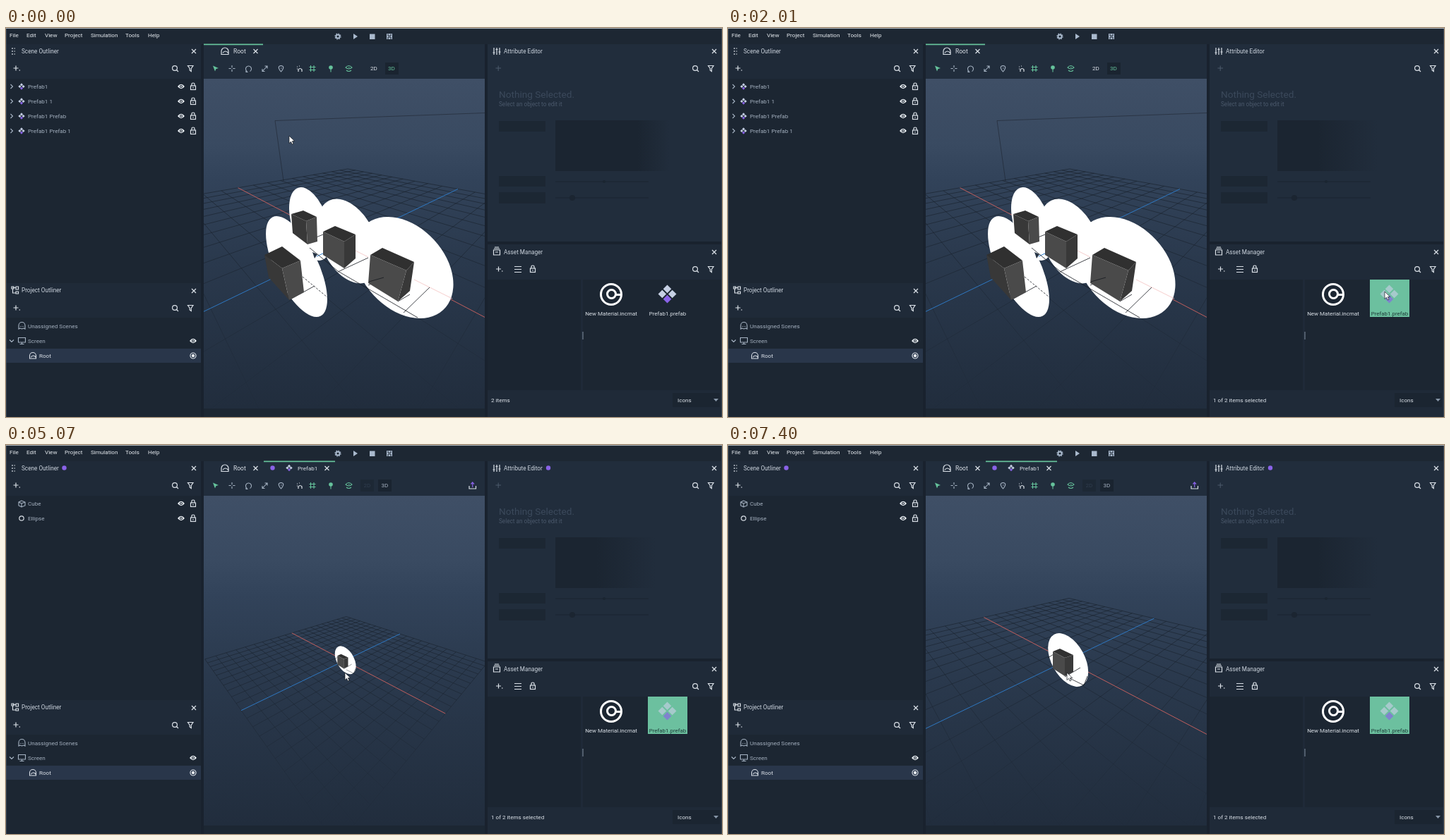
An HTML page for the animation above (8 s loop, 1014 by 552 pixels).

```html
<!DOCTYPE html>
<html lang="en">
<head>
<meta charset="utf-8">
<title>Prefab editor</title>
<style>
html, body { margin: 0; width: 100%; height: 100%; overflow: hidden; background: #1a2430; }
svg { display: block; width: 1014px; height: 552px; }
text { font: 8.1px Roboto, sans-serif; fill: #a4b0bf; }
.menu text { fill: #e6ebf0; }
.head text { font-size: 8.2px; fill: #ccd4de; }
.bright { fill: #dce2e9; }
.line { fill: none; stroke: #dbe1e8; stroke-width: 1.2; }
.grey { fill: none; stroke: #a7b4c4; stroke-width: 1.1; }
.green { fill: none; stroke: #66c39c; stroke-width: 1.1; }
.ink { fill: none; stroke: #15191f; stroke-width: .8; }
.mid { text-anchor: middle; }
</style>
</head>
<body>
<svg viewBox="0 0 1014 552">
<defs>
  <linearGradient id="sky" x2="0" y2="1">
    <stop stop-color="#3f4f66"/><stop offset=".2" stop-color="#394a61"/>
    <stop offset=".3" stop-color="#32435a"/><stop offset=".55" stop-color="#2a394d"/>
    <stop offset="1" stop-color="#212d3d"/>
  </linearGradient>
  <linearGradient id="fade" gradientUnits="userSpaceOnUse" x1="0" y1="200" x2="0" y2="520">
    <stop stop-color="#18212c" stop-opacity=".9"/><stop offset=".4" stop-color="#18212c" stop-opacity=".8"/>
    <stop offset="1" stop-color="#18212c" stop-opacity=".15"/>
  </linearGradient>
  <linearGradient id="longFade">
    <stop offset=".72" stop-color="#1b2531"/><stop offset="1" stop-color="#1b2531" stop-opacity="0"/>
  </linearGradient>
  <linearGradient id="shortFade">
    <stop offset=".38" stop-color="#1b2531"/><stop offset=".95" stop-color="#1b2531" stop-opacity="0"/>
  </linearGradient>
  <clipPath id="port"><rect x="280" y="72" width="398" height="468"/></clipPath>

  <path id="dia" d="M0-2.1 2.1 0 0 2.1-2.1 0Z"/>
  <g id="prefab">
    <g fill="#c6d0e4"><use href="#dia" y="-2.6"/><use href="#dia" x="-2.6"/><use href="#dia" x="2.6"/></g>
    <use href="#dia" y="2.6" fill="#8a63e8"/>
  </g>
  <path id="x" class="line" d="M-3-3 3 3M3-3-3 3"/>
  <g id="eye">
    <path d="M-5 0Q0-6.4 5 0 0 6.4-5 0Z" fill="#e8edf2"/>
    <circle r="2.1" fill="#1c2632"/><circle r="1" fill="#e8edf2"/>
  </g>
  <g id="lock" class="line">
    <rect x="-3.5" y="-1" width="7" height="5.5"/><path d="M-2-1V-3Q-2-5 0-5T2-3V-1M0 1V2.4"/>
  </g>
  <g id="add"><path class="line" d="M-4 0H3M-.5-3.5V3.5"/><circle cx="4.8" cy="3" r=".8" fill="#dbe1e8"/></g>
  <g id="tools">
    <use href="#x" x="266" y="33"/>
    <circle class="line" cx="239" cy="57" r="3.4"/><path class="line" d="M241.5 59.5 244 62"/>
    <path class="line" d="M257.5 53.5H265L262.3 57.5V61.5L260.2 60V57.5Z"/>
  </g>
  <g id="vis"><use href="#eye" x="248"/><use href="#lock" x="265"/></g>
  <g id="row"><path class="grey" d="M6.5-3 9.5 0 6.5 3"/><use href="#prefab" x="22"/><use href="#vis"/></g>
  <path id="arch" class="line" d="M-5 4.5V0A5 5 0 0 1 5 0V4.5ZM-3 2.5Q0-2.5 5 2.5"/>
  <circle id="dot" r="3.2" fill="#8a63e8"/>
  <path id="tree" class="line" d="M-5-5H-2V-2H-5ZM-3.5-2V4H1M-3.5-3.500H1M1-5H4.500V-1H1ZM1 2H4.500V5H1Z"/>
</defs>

<!-- panels -->
<rect width="1014" height="552" fill="#19222e"/>
<rect y="1" width="1014" height="22" fill="#1d2733"/>
<rect y="23" width="276" height="529" fill="#1c2632"/>
<rect y="23" width="276" height="49" fill="#1f2a38"/>
<rect y="362" width="276" height="49" fill="#1f2a38"/>
<rect y="455" width="276" height="20" fill="#29364a"/>
<rect x="280" y="23" width="398" height="49" fill="#212d3c"/>
<rect x="280" y="540" width="398" height="12" fill="#1c2733"/>
<rect x="682" y="23" width="331" height="280" fill="#212d3c"/>
<rect x="682" y="307" width="331" height="245" fill="#1f2a38"/>
<rect x="682" y="357" width="132" height="157" fill="#1b2531"/>
<rect x="817" y="357" width="196" height="157" fill="#1c2632"/>
<rect x="944" y="518" width="67" height="20" fill="#1b2531"/>
<path d="M817 431V442" stroke="#748293" stroke-width="1.2"/>
<path d="M0 .5H1014" stroke="#aeb4ba"/>
<path d="M.5 1V552M1013.5 1V552" stroke="#4b5663" stroke-width=".6"/>

<g class="menu">
  <text x="5" y="12.5">File</text><text x="29" y="12.5">Edit</text><text x="55" y="12.5">View</text>
  <text x="83" y="12.5">Project</text><text x="120" y="12.5">Simulation</text>
  <text x="169" y="12.5">Tools</text><text x="201" y="12.5">Help</text>
</g>
<g fill="#a9b9cd">
  <circle cx="470" cy="12" r="2.6" fill="none" stroke="#a9b9cd" stroke-width="2"/>
  <circle cx="470" cy="12" r="4" fill="none" stroke="#a9b9cd" stroke-width="1.2" stroke-dasharray="1.6 1.54"/>
  <path d="M492 8 498 12 492 16ZM515 8.5H522.5V16H515ZM539 8H547V16H539Z"/>
  <path d="M541 8.5V11H545V8.5M541 16V13H545V16" fill="none" stroke="#1d2733"/>
</g>

<g class="head">
  <text x="22" y="36">Scene Outliner</text><text x="22" y="375">Project Outliner</text>
  <text x="705" y="36">Attribute Editor</text><text x="705" y="321">Asset Manager</text>
</g>
<path class="line" d="M9 28V38" stroke-dasharray="2 2"/><path class="line" d="M11.5 29H13M11.5 33H13M11.5 37H13"/>
<use href="#tree" x="13" y="372"/>
<path class="line" d="M691 28V38M695 28V38M699 28V38M689.5 35H692.5M693.5 30.5H696.5M697.5 34H700.5"/>
<path class="line" d="M691 313H699M692 311H698M690.5 315H699.5V322H690.5ZM693 318H697"/>
<use href="#tools"/><use href="#tools" y="340"/><use href="#tools" x="737"/><use href="#tools" x="737" y="285"/>
<use href="#add" x="14.5" y="57"/><use href="#add" x="14.5" y="397"/><use href="#add" x="698" y="342"/>
<path class="line" d="M720 338.5H730M720 342.5H730M720 346.5H730"/><use href="#lock" x="746" y="342"/>
<path d="M693.5 57H701M697.2 53.5V61" stroke="#4c5a6c"/>

<!-- project outliner -->
<path class="grey" d="M18 427V422A4.5 4.5 0 0 1 27 422V427L25 426 22.5 427 20 426ZM21 423V424M24 423V424"/>
<text x="31" y="426">Unassigned Scenes</text>
<path class="grey" d="M5 442.5 8 445.5 11 442.5M17.5 439.5H27.5V446H17.5ZM22.5 446V448.5M19.5 448.5H25.5"/>
<text x="31" y="447">Screen</text><use href="#eye" x="265" y="444"/>
<use href="#arch" transform="translate(38 465) scale(.9)"/>
<text x="47" y="468" class="bright">Root</text>
<circle class="line" cx="265" cy="465" r="4"/><circle cx="265" cy="465" r="2.2" fill="#e8edf2"/>

<!-- scene outliner -->
<g data-on="0 3310">
  <use href="#row" y="83"/><text x="31" y="86">Prefab1</text>
  <use href="#row" y="104"/><text x="31" y="107">Prefab1 1</text>
  <use href="#row" y="125"/><text x="31" y="128">Prefab1 Prefab</text>
  <use href="#row" y="146"/><text x="31" y="149">Prefab1 Prefab 1</text>
</g>
<g data-on="3310 8000">
  <path class="grey" d="M18 81 22 79 27 81V86L22 88 18 86ZM18 81 22 83 27 81M22 83V88"/>
  <circle class="line" cx="22" cy="104" r="3.2" stroke-width="1.6"/>
  <text x="31" y="86">Cube</text><text x="31" y="107">Ellipse</text>
  <use href="#vis" y="83"/><use href="#vis" y="104"/>
  <use href="#dot" x="82.5" y="32.5"/><use href="#dot" x="768" y="32.5"/>
</g>

<!-- tabs and view tools -->
<g data-on="0 3310">
  <rect x="280" y="22.5" width="84" height="1.7" fill="#66c39c"/>
  <rect x="537" y="49" width="19" height="17" fill="#1a2430"/>
  <text class="mid bright" x="521" y="60">2D</text><text class="mid" x="546" y="60" style="fill:#66c39c">3D</text>
</g>
<g data-on="3310 8000">
  <rect x="365" y="22.5" width="101" height="1.7" fill="#66c39c"/>
  <use href="#dot" x="377.5" y="32.5"/><use href="#prefab" x="401" y="32.5"/>
  <text x="413" y="36" class="bright">Prefab1</text><use href="#x" x="454.5" y="33"/>
  <rect x="502" y="49" width="19" height="17" fill="#1d2835"/><rect x="527" y="49" width="19" height="17" fill="#1a2430"/>
  <text class="mid" x="511.5" y="60" style="fill:#303d4e">2D</text><text class="mid" x="536.5" y="60">3D</text>
  <path class="line" d="M656 58V62H665.5V58"/><path d="M660.7 60V53M658.5 55.5 660.7 53 663 55.5" fill="none" stroke="#8a63e8" stroke-width="1.2"/>
</g>
<use href="#arch" x="310" y="33"/><text x="322" y="36" class="bright" style="font-size:8.5px">Root</text><use href="#x" x="353.5" y="33"/>
<path d="M293 53.5 301 57 297.5 58 296 61.5Z" fill="#66c39c"/>
<path class="grey" d="M320 53V62M315.5 57.5H324.5" stroke-dasharray="3.2 2.6" stroke-width="2"/>
<path class="grey" d="M341.5 61.5A4 4 0 1 1 345.5 61.5M340 60V62.5H342.5"/>
<path class="grey" d="M363.5 61 369.5 54.5M366.5 54H370V57.5M363 58V61.5H366.5"/>
<path class="grey" d="M389.5 62Q383 54 389.5 53.5 396 54 389.5 62ZM389 57H390.5"/>
<path class="line" d="M414 62V59Q416.5 56 419 59V62M412 55H413M415 54H416M412 58H413"/>
<path class="green" d="M431.5 53V62M436 53V62M429.5 55.5H438.5M429.5 59.5H438.5"/>
<circle cx="460" cy="56" r="2.8" fill="#66c39c"/><path class="green" d="M460 58V62.5"/>
<path class="green" d="M481 56Q485.5 51 490 56 485.5 60 481 56ZM482 60Q485.5 63 489 60M485 56H486.5"/>

<!-- attribute editor -->
<text x="698" y="99" style="font-size:13.6px;fill:#3b495b">Nothing Selected.</text>
<text x="698" y="111" style="font-size:8.2px;fill:#4a586b">Select an object to edit it</text>
<path d="M698 132H764V147H698ZM698 210H764V225H698ZM698 233H764V249H698Z" fill="#1c2733"/>
<rect data-on="0 2010" x="778" y="131" width="162" height="72" fill="url(#longFade)"/>
<rect data-on="2010 8000" x="778" y="131" width="150" height="72" fill="url(#shortFade)"/>
<path d="M778 218H910M778 241H910" stroke="#1b2531" stroke-width="1.2"/>
<g fill="#1b2531"><circle cx="847" cy="218" r="2"/><circle cx="802" cy="241" r="4"/></g>

<!-- asset manager -->
<rect data-on="1180 2010" x="909" y="357" width="56" height="53" fill="#323f57"/>
<rect data-on="2010 8000" x="909" y="357" width="56" height="53" fill="#6cc09f"/>
<rect data-on="4260 4410" x="819" y="357" width="77" height="53" fill="#323f57"/>
<g fill="none" stroke="#fff" stroke-width="3">
  <circle cx="857" cy="378" r="14.5"/><circle cx="857.5" cy="377.5" r="6"/><path d="M863 378.5H871"/>
</g>
<text class="mid bright" x="857" y="408" style="font-size:8px">New Material.incmat</text>
<use href="#prefab" transform="translate(936.5 377.5) scale(2.75)" data-on="0 2010"/>
<use href="#prefab" transform="translate(936.5 377.5) scale(2.75)" opacity=".65" data-on="2010 8000"/>
<text class="mid bright" x="937" y="408" style="font-size:7.9px" data-on="0 2010">Prefab1.prefab</text>
<text class="mid" x="937" y="408" style="font-size:7.9px;fill:#1d3a38" data-on="2010 8000">Prefab1.prefab</text>
<text class="bright" x="687" y="531" data-on="0 2010">2 items</text>
<text class="bright" x="687" y="531" data-on="2010 8000">1 of 2 items selected</text>
<text class="bright" x="951" y="531">Icons</text><path d="M1002 526H1009L1005.5 530Z" fill="#8796a8"/>

<!-- viewport -->
<g clip-path="url(#port)">
  <rect x="280" y="72" width="398" height="468" fill="url(#sky)"/>
  <path id="grid" fill="none" stroke="url(#fade)" stroke-width=".75"/>
  <path id="red" fill="none" stroke="#d0625f" stroke-width=".9"/>
  <path id="blue" fill="none" stroke="#2f7fd0" stroke-width=".9"/>
  <g data-on="0 3990">
    <path class="ink" d="M678 120.500 381 131.500 393 217" opacity=".55"/>
    <g fill="#fff">
      <ellipse rx="54" ry="25.6" transform="translate(430.5 278) rotate(72)"/>
      <ellipse rx="63.8" ry="38.3" transform="translate(485 302.5) rotate(64.8)"/>
      <ellipse rx="81.9" ry="58.1" transform="translate(563.5 340) rotate(47.4)"/>
      <ellipse rx="78" ry="30.3" transform="translate(411.5 338.5) rotate(64.3)"/>
    </g>
    <path d="M434 318 441 321 437 327Z" fill="#263344"/>
    <path d="M495 316 513 325M578 357 632 384" stroke="#f3c0bf" stroke-width=".8"/>
    <path d="M440 324 464 313" stroke="#2f7fd0"/>
    <path class="ink" d="M430 312 470 345 583 411M427 302 449 293M470 346 513 326M401 386 437 366M513 365 536 354M563 404 600 368M555 388 572 378"/>
    <path class="ink" d="M420 353 455 382" stroke-dasharray="3 2"/>
    <path fill="#303030" d="M404 264 421 259 440 268 425 274ZM449 289 466 281 495 293 479 303ZM516 322 533 312 578 332 567 344ZM366 322 391 310 417 330 391 341Z"/>
    <path fill="#383838" d="M404 264 425 274 427 307 406 291ZM366 322 391 341 401 386 372 354ZM567 344 578 332 572 373 555 388ZM479 303 495 293 495 327 479 341Z"/>
    <path fill="#4a4a4a" d="M425 274 440 268 441 303 427 307ZM391 341 417 330 422 375 401 386ZM516 322 567 344 555 388 513 362ZM449 289 479 303 479 341 449 322Z"/>
    <path class="ink" d="M514 360 535 354" stroke-width=".6"/>
  </g>
  <g id="solo" data-on="3990 8000">
    <ellipse rx="41.3" ry="23.4" transform="translate(481.7 305) rotate(61.5)" fill="#fff"/>
    <path class="ink" d="M477 329 499 316M453 302 461 297M484 331 504 341 509 328"/>
    <path d="M460 293 470 289 489 298 477 302Z" fill="#303030"/>
    <path d="M460 293 477 302 477 328 460 317Z" fill="#4a4a4a"/>
    <path d="M477 302 489 298 489 322 477 328Z" fill="#3a3a3a"/>
  </g>
</g>

<path id="cursor" d="M0 0V10.5L2.5 8.3 4.2 12 6 11.2 4.4 7.6H7.8Z" fill="#fff" stroke="#10151b" stroke-width=".7"/>
</svg>
<script>
const LOOP = 8000;
const $ = id => document.getElementById(id);

// [time, x, y] of the pointer tip
const pointer = [
  [0, 401, 153], [400, 450, 150], [530, 542, 148], [670, 665, 210], [820, 740, 262],
  [940, 825, 318], [1060, 885, 355], [1180, 912, 373], [1460, 915, 373.5], [1610, 930, 374],
  [4260, 852, 380], [4410, 738, 352], [4540, 648, 331], [4680, 580, 315], [4800, 525, 305],
  [4950, 495, 314], [5070, 480, 323]
];
// [time, grid half size / camera distance]
const zooms = [
  [0, 1.5], [3990, .504], [5340, .515], [5780, .565], [6050, .628],
  [6560, .7], [6870, .778], [7120, .862], [7400, .962]
];
const toggles = [...document.querySelectorAll('[data-on]')].map(el => {
  const [from, to] = el.dataset.on.split(' ').map(Number);
  return { el, from, to };
});
const at = (steps, t) => steps.findLast(step => step[0] <= t);

// Orbit camera aimed at the centre of a unit grid
const FOCAL = 281, DX = .692, DY = .722, PITCH = .504, TILT = .863, NEAR = .05;

function project(u, v, s) {
  const w = 1 - s * TILT * (DY * u + DX * v), k = FOCAL * s / w;
  const x = 479.4 + k * (DX * u - DY * v);
  const y = 306 + k * PITCH * (DY * u + DX * v);
  return x.toFixed(1) + ' ' + y.toFixed(1);
}

function alongU(v, s) {
  const end = Math.min(1, ((1 - NEAR) / (s * TILT) - DX * v) / DY);
  return `M${project(-1, v, s)}L${project(end, v, s)}`;
}

function alongV(u, s) {
  const end = Math.min(1, ((1 - NEAR) / (s * TILT) - DY * u) / DX);
  return `M${project(u, -1, s)}L${project(u, end, s)}`;
}

function drawView(s) {
  let d = '';
  for (let i = -10; i <= 10; i++) if (i) d += alongU(i / 10, s) + alongV(i / 10, s);
  $('grid').setAttribute('d', d);
  $('red').setAttribute('d', alongU(0, s));
  $('blue').setAttribute('d', alongV(0, s));
  $('solo').setAttribute('transform', `translate(479.5 305.5) scale(${s / .962}) translate(-479.5 -305.5)`);
}

let shown;
function frame(now) {
  const t = now % LOOP;
  const [, x, y] = at(pointer, t), [, s] = at(zooms, t);
  $('cursor').setAttribute('transform', `translate(${x} ${y})`);
  if (s !== shown) drawView(shown = s);
  for (const { el, from, to } of toggles) el.style.display = t >= from && t < to ? '' : 'none';
  requestAnimationFrame(frame);
}
frame(performance.now());
</script>
</body>
</html>
```
